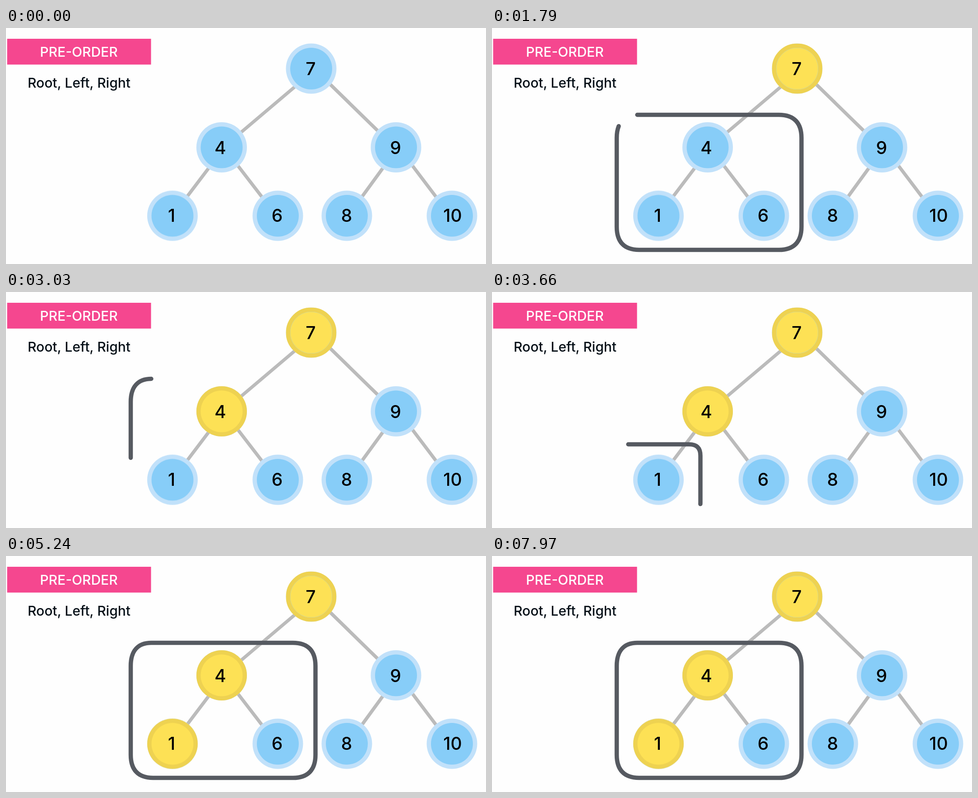
These frames come from a looping animation (1064x526 px, 8000 ms). An HTML page:

```html
<!DOCTYPE html>
<html lang="en">
<head>
<meta charset="utf-8">
<title>Pre-order traversal</title>
<style>
  html, body { margin: 0; width: 100%; height: 100%; overflow: hidden; background: #fefefe; }
  svg { display: block; width: 100vw; height: 100vh; }
  text { font-family: Inter, Roboto, sans-serif; font-weight: 500; text-anchor: middle; }
  .label { font-size: 30px; }
  .digit { font-size: 39px; }
  .edges { stroke: #bbb; stroke-width: 7.5; }
  .halo { fill: #c1e1fa; }
  .disc { fill: #87cdf8; }
  .rim { fill: #eed251; }
  .core { fill: #fde155; }
  .ring { fill: none; stroke: #eed251; }

  .frame {
    fill: none; stroke: #565a61; stroke-width: 9.5; stroke-linecap: round;
    stroke-dasharray: 1000 3000; stroke-dashoffset: 1001;
  }

  /* Every animation shares one 8 s loop: 1% = 80 ms */
  .core, .rim, .ring, .frame { animation: 8s linear infinite; }
  .root .core { animation-name: root-core; }
  .root .ring { animation-name: root-ring; }
  .left .core { animation-name: left-core; }
  .left .rim { animation-name: left-rim; }
  .leaf .core { animation-name: leaf-core; }
  .leaf .rim { animation-name: leaf-rim; }
  .big { animation-name: big-frame; }
  .small { animation-name: small-frame; }

  @keyframes root-core {
    0%, 6.625% { transform: scale(0); }
    9.125% { transform: scale(.75); }
    10.625%, 11.5% { transform: scale(.93); }
    11.625%, 100% { transform: scale(1); }
  }
  @keyframes root-ring {
    0%, 9.125% { r: 56px; stroke-width: 0; }
    10.625%, 11.5% { r: 55px; stroke-width: 2px; }
    11.625%, 100% { r: 51.25px; stroke-width: 9.5px; }
  }
  @keyframes left-core {
    0%, 25.9% { transform: scale(0); }
    28.4% { transform: scale(.78); }
    29.9%, 100% { transform: scale(1); }
  }
  @keyframes left-rim {
    0%, 25.9% { transform: scale(0); }
    28.4% { transform: scale(.78); }
    29.9% { transform: scale(.93); }
    30.9%, 100% { transform: scale(1); }
  }
  @keyframes leaf-core {
    0%, 52.5% { transform: scale(0); }
    55% { transform: scale(.78); }
    57.625%, 100% { transform: scale(1); }
  }
  @keyframes leaf-rim {
    0%, 52.5% { transform: scale(0); }
    55% { transform: scale(.78); }
    57.625%, 58.375% { transform: scale(.93); }
    58.5%, 100% { transform: scale(1); }
  }
  @keyframes big-frame {
    0% { stroke-dashoffset: 1001; }
    16.5% { stroke-dashoffset: 1001; animation-timing-function: ease-in-out; }
    22.375% { stroke-dashoffset: 39; }
    23.25% { stroke-dashoffset: 0; }
    32% { stroke-dashoffset: 0; animation-timing-function: ease-in; }
    37.875% { stroke-dashoffset: -848; }
    39.625% { stroke-dashoffset: -1001; animation-timing-function: step-start; }
    39.63% { stroke-dashoffset: 1001; }
    58.2% { stroke-dashoffset: 1001; animation-timing-function: ease-in-out; }
    65.4%, 100% { stroke-dashoffset: 0; }
  }
  @keyframes small-frame {
    0% { stroke-dashoffset: 1001; }
    42.5% { stroke-dashoffset: 1001; animation-timing-function: ease-in-out; }
    49.5% { stroke-dashoffset: 0; }
    58.4% { stroke-dashoffset: 0; animation-timing-function: ease-in-out; }
    65.3%, 100% { stroke-dashoffset: -1001; }
  }
</style>
</head>
<body>
<svg viewBox="0 0 1064 526" preserveAspectRatio="none">
  <rect x="2.5" y="24" width="319" height="57.5" fill="#f5478f"/>
  <text class="label" x="161.5" y="64" fill="#fff">PRE-ORDER</text>
  <text class="label" x="162" y="133" fill="#061018">Root, Left, Right</text>

  <path class="edges" d="M645 127L517 236M714 121L829 234M451 310L399 379M511 303L570 380M837 310L787 379M898 303L956 380"/>
  <g id="nodes"></g>

  <path class="frame big" pathLength="1000"
    d="M322 193.5H636C670 193.5 686 212 686 245V443C686 476 670 494.5 636 494.5H326C292 494.5 276.5 476 276.5 443V245C276.5 212 292 193.5 322 193.5Z"/>
  <path class="frame small" pathLength="1000"
    d="M302 339.5H437C454 339.5 462 348 462 365V469C462 486 454 494.5 437 494.5H302C285 494.5 276.5 486 276.5 469V365C276.5 348 285 339.5 302 339.5Z"/>
</svg>
<script>
  const circle = (name, r) => `<circle class="${name}" r="${r}"/>`;
  const grown = circle('rim', 56) + circle('core', 46.5);
  const paint = {
    root: circle('core', 46.5) + circle('ring', 51.25),
    left: grown,
    leaf: grown
  };

  // value, centre x, centre y, text shift x, role
  const nodes = [
    [7, 676.5, 90.5, -1, 'root'],
    [4, 478, 266, -3, 'left'],
    [9, 864.5, 266, -1],
    [1, 369, 418.5, -2, 'leaf'],
    [6, 602.5, 418.5, -1.5],
    [8, 755.5, 418.5, -.5],
    [10, 988.5, 418.5, 1.5]
  ];

  document.getElementById('nodes').innerHTML = nodes.map(([value, x, y, dx, role = '']) =>
    `<g class="${role}" transform="translate(${x} ${y})">
      ${circle('halo', 56)}${circle('disc', 46.5)}${paint[role] || ''}
      <text class="digit" x="${dx}" y="${y > 400 ? 13 : 14.5}">${value}</text>
    </g>`).join('');
</script>
</body>
</html>
```
